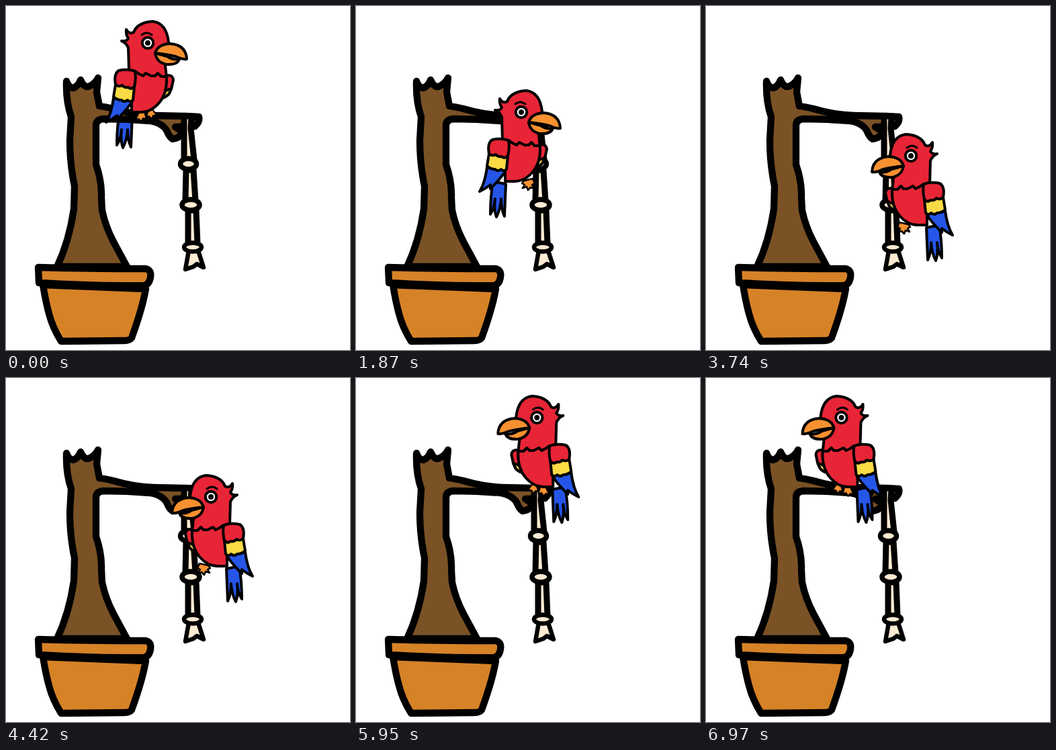
Recreate the animation shown at these times as an HTML page. Size 512x512 px, loop 7.14 s.

```html
<!DOCTYPE html>
<html lang="en">
<head>
<meta charset="utf-8">
<title>Parrot on a perch</title>
<style>
  html, body { margin: 0; height: 100%; overflow: hidden; background: #fff; }
  svg { display: block; width: 100vw; height: 100vh; }
  path, ellipse, circle { stroke: #000; stroke-linejoin: round; stroke-linecap: round; }
  .thick { stroke-width: 10.3; }
  .bird { stroke-width: 4; }
  .brown { fill: #7a5226; }
  .clay { fill: #d68227; }
  .cream { fill: #fdebd3; }
  .red { fill: #e72536; }
  .yellow { fill: #fbdb45; }
  .blue { fill: #2556e8; }
  .orange { fill: #f79130; }
  .line { fill: none; }
</style>
</head>
<body>
<svg viewBox="0 0 512 512">
  <defs>
    <path id="tail" class="blue" d="M169 158L188 162L186 210Q181 200 181 184Q180 200 174 211Q170 200 172 184Q171 198 165 207Q165 180 169 158Z"/>
  </defs>

  <g class="bird" id="backTail"><use href="#tail"/></g>

  <g class="thick">
    <path class="brown" d="M90 112Q94 122 100 122Q108 119 111 110Q116 121 122 120Q132 117 137 107L135 128L139 149
      Q148 150 160 153Q190 162 220 163L268 164L287 165Q289 172 281 179L252 180L262 187Q261 196 248 198Q243 195 239 185
      Q232 174 215 171Q180 168 145 168Q134 169 134 178L134 236Q143 262 142 285L143 304Q148 328 160 351L180 388L76 388
      Q94 350 101 302L102 268Q95 235 95 200L97 165Q89 142 90 112Z"/>
    <path class="clay" d="M55 415L208 421Q203 450 187 494Q184 498 176 498L82 499Q69 478 64 458Q59 440 55 415Z"/>
    <path class="clay" d="M48 389Q120 391 208 391Q217 393 215 404Q213 415 205 416Q125 417 49 412Z"/>
  </g>

  <g class="cream" stroke-width="9">
    <path d="M265 164L276 164L275 182L280 229L265 229L265 182Z"/>
    <path d="M268 244L279 244L282 290L267 290Z"/>
    <path d="M271 304L283 304L285 354L271 354Z"/>
    <path stroke-width="6.5" d="M272 364L286 364L294 389L284 384L279 388L267 392Z"/>
    <ellipse cx="271.5" cy="235" rx="12" ry="8" stroke-width="7.5"/>
    <ellipse cx="275" cy="296" rx="13" ry="8" stroke-width="7.5"/>
    <ellipse cx="278" cy="359" rx="13" ry="6.5" stroke-width="6.5"/>
  </g>

  <g class="bird" id="bird">
    <use href="#tail" id="frontTail"/>
    <g id="perchFeet" class="orange" stroke-width="2">
      <path d="M198 158L206 158L209 168L204 167L201 172L198 168L193 169Z"/>
      <path d="M212 155L219 155L224 163L219 163L217 168L213 164L209 165Z"/>
    </g>
    <path id="gripFoot" class="orange" stroke-width="2.5" d="M215 157L228 154L231 161L227 163L231 169L225 167L221 171L219 166L213 168L216 163L212 161Z"/>
    <path class="red" d="M237 104Q248 101 249 110L246 124L235 128Z"/>
    <path class="yellow" d="M236 127L245 123Q245 133 233 137Z"/>
    <path class="red" d="M183 97L182 62Q178 54 172 52Q180 53 182 48Q178 43 179 35Q184 43 190 39C194 28 207 23 219 23
      C233 25 240 36 242 54L236 80L239 106Q240 130 228 144Q216 158 201 158L187 158L187 140Z"/>
    <path class="line" d="M192 97L198 101L204 104L208 100L216 104L222 104L226 100L231 105L237 105"/>
    <path class="blue" d="M160 137L188 141Q184 150 165 169L165 163Q159 168 149 173Q157 160 160 137Z"/>
    <path class="yellow" d="M163 117L191 120L189 140Q184 144 181 140Q176 144 172 140Q165 140 160 135Z"/>
    <path class="red" d="M163 117Q160 101 168 96Q181 93 192 97Q194 107 191 120Q186 125 182 121Q176 122 173 118Q168 121 163 117Z"/>
    <path class="orange" d="M222 70L240 75Q249 81 258 79Q255 88 239 87Q224 84 222 70Z"/>
    <path class="orange" d="M222 70Q226 57 244 56Q268 58 269 79Q262 80 255 76Q247 73 222 70Z"/>
    <circle cx="211" cy="55" r="8.2" fill="#fff"/>
    <circle cx="211" cy="55" r="3.2" stroke-width="1.5"/>
    <path class="line" stroke-width="3" d="M202 43Q209 37 217 43"/>
  </g>
</svg>
<script>
  const STEP = 170, STEPS = 42;
  const byId = id => document.getElementById(id);
  const show = (id, on) => byId(id).style.display = on ? '' : 'none';

  // Where the bird is at each step; when facing left, x is the mirrored origin.
  function pose(s) {
    if (s <= 6) return { x: s * 20 / 3, y: 0 };
    if (s === 7) return { x: 43, y: 12 };
    if (s <= 12) return { x: 35, y: 12 + 22.75 * (Math.min(s, 11) - 7) };
    if (s <= 20) return { x: 35, y: 103 + 11.6 * (Math.min(s, 19) - 12) };
    if (s <= 33) return { x: 516, y: 122 - 11.5 * (s - 26), left: true };
    if (s === 34) return { x: 499, y: 30, left: true };
    return { x: 480.3 - 11.3 * (s - 35), y: 4, left: true };
  }

  function draw(now) {
    const s = Math.floor(now / STEP) % STEPS;
    const { x, y, left } = pose(s);
    const perched = s <= 6 || s >= 35;
    const place = `translate(${x} ${y}) scale(${left ? -1 : 1} 1)`;
    byId('bird').setAttribute('transform', place);
    byId('backTail').setAttribute('transform', place);
    show('backTail', !left);
    show('frontTail', left);
    show('perchFeet', perched);
    show('gripFoot', !perched);
    requestAnimationFrame(now => draw(Math.max(0, now - start)));
  }
  const start = performance.now();
  draw(0);
</script>
</body>
</html>
```
